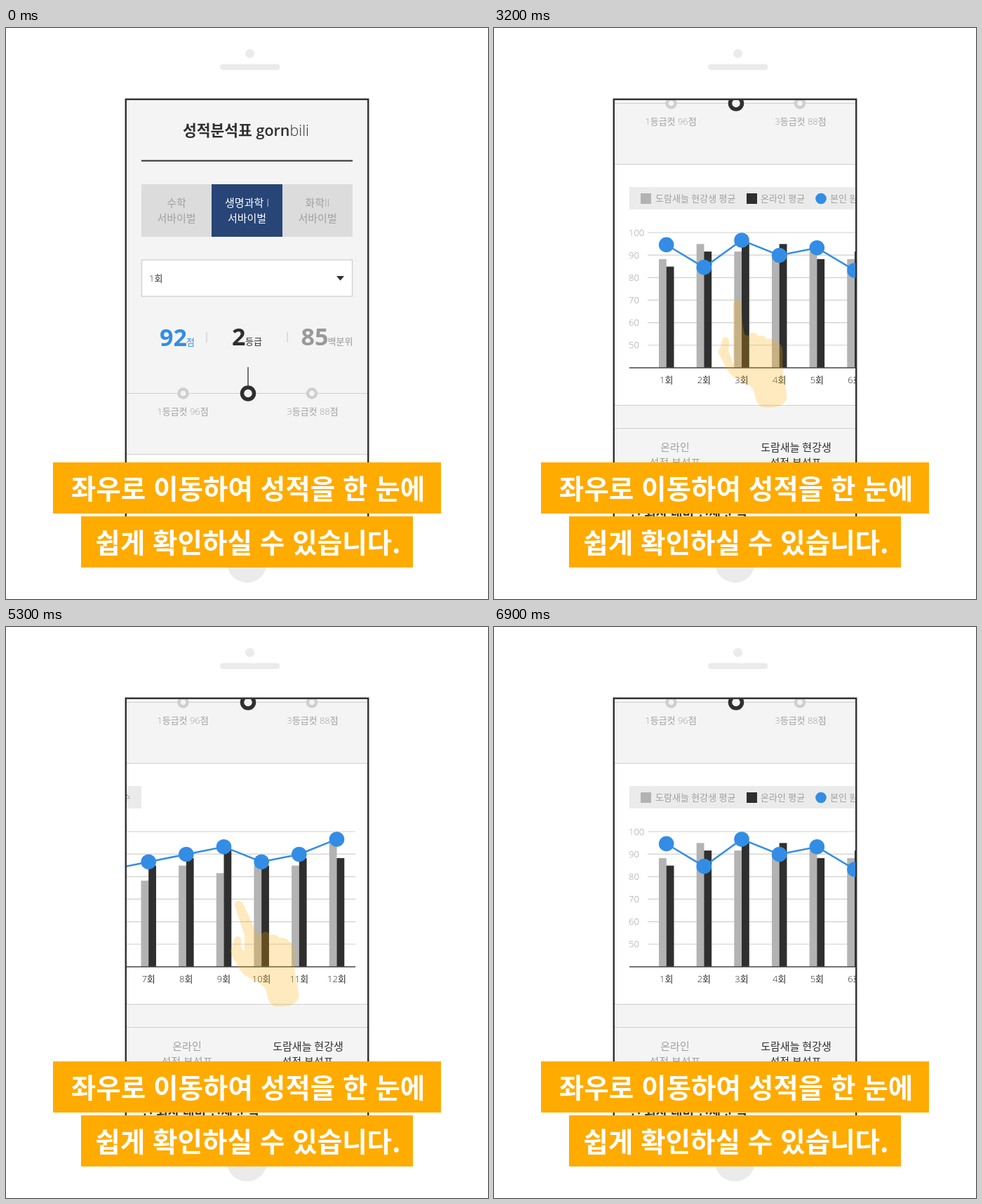
Recreate the animation shown at these times as an HTML page. Size 687 px wide and 815 px high, loop 7000 ms.

```html
<!DOCTYPE html>
<html lang="ko">
<head>
<meta charset="utf-8">
<style>
html, body { margin: 0; width: 100%; height: 100%; overflow: hidden; background: #fff; }
svg { display: block; }
text { font: 300 13px "Open Sans", "Noto Sans CJK KR", sans-serif; white-space: pre; }
</style>
</head>
<body>
<svg id="stage" width="687" height="815" viewBox="0 0 687 815"></svg>
<script>
const DARK = '#2f2f2f', GREY = '#a0a0a0', RULE = '#cfcfcf', PALE = '#ebebeb',
      PANEL = '#f4f4f4', BLUE = '#338de4', AMBER = '#ffab00';

const rect = (x, y, w, h, fill, more = '') =>
  `<rect x="${x}" y="${y}" width="${w}" height="${h}" fill="${fill}" ${more}/>`;
const line = (x1, y1, x2, y2, color, w = 1.2) =>
  `<path d="M${x1} ${y1}L${x2} ${y2}" stroke="${color}" stroke-width="${w}"/>`;
const dot = (x, y, r, fill, more = '') =>
  `<circle cx="${x}" cy="${y}" r="${r}" fill="${fill}" ${more}/>`;
const ring = (x, y, r, color, w) => dot(x, y, r, PANEL, `stroke="${color}" stroke-width="${w}"`);
const text = (x, y, str, color, size = 13, weight = 300, anchor = 'start') =>
  `<text x="${x}" y="${y}" fill="${color}" text-anchor="${anchor}" style="font-size:${size}px;font-weight:${weight}">${str}</text>`;
const label = (x, y, str, color, size, weight) => text(x, y, str, color, size, weight, 'middle');

function tab(x, w, title, fill, color) {
  const mid = x + w / 2;
  return rect(x, 223, w, 75, fill) + label(mid, 255, title, color, 15) + label(mid, 276.5, '서바이벌', color, 15);
}

function score(x, unitX, value, unit, color, unitColor, y = 453) {
  return text(x, y, value, color, 34, 700) + text(unitX, y - 1, unit, unitColor);
}

function summary() {
  return text(252, 153.5, '성적분석표 gorn<tspan style="font-weight:300">bili</tspan>', DARK, 21.5, 600)
    + line(193, 189.5, 494, 189.5, DARK, 2.2)
    + tab(193, 100, '수학', '#dcdcdc', GREY)
    + tab(394, 100, '화학II', '#dcdcdc', GREY)
    + tab(293, 101, '생명과학 I', '#284577', '#fff')
    + rect(193.5, 331, 300, 52, '#fff', 'stroke="#ccc" stroke-width="1.2"')
    + text(204, 362, '1회', DARK)
    + `<path d="M471 354h11l-5.5 6.5z" fill="${DARK}"/>`
    + score(219, 257, '92', '점', BLUE, BLUE, 454)
    + score(322, 341, '2', '등급', DARK, DARK)
    + score(420.5, 458.5, '85', '백분위', '#999', '#999')
    + line(286, 434, 286, 449, RULE) + line(401, 434, 401, 449, RULE)
    + line(172, 521.5, 516, 521.5, RULE) + line(345, 484, 345, 513, DARK, 1.3)
    + ring(252.5, 521.5, 6, RULE, 4.5) + ring(436, 521.5, 6, RULE, 4.5) + ring(345, 521.5, 8.5, DARK, 5.5)
    + label(252, 552, '1등급컷 96점', GREY) + label(437, 552, '3등급컷 88점', GREY);
}

// Levels count down from the top grid line.
const classLevel = [3.5, 1.5, 2.5, 3, 2.5, 3.5, 6.5, 4.5, 5.5, 4.5, 4.5, 1.5];
const onlineLevel = [4.5, 2.5, 1.5, 1.5, 3.5, 2.5, 4.5, 3.5, 2.5, 4.5, 3.5, 3.5];
const ownLevel = [1.6, 4.6, 1, 3, 2, 5, 4, 3, 2, 4, 3, 1];
const levelY = v => 706.2 + v * 10.75;
const roundX = i => 245.7 + i * 53.66;

function chart() {
  let s = rect(193, 641, 364.5, 32, PALE)
    + rect(209, 650, 15, 15, '#b3b3b3') + text(230, 662, '도람새늘 현강생 평균', GREY)
    + rect(360, 650, 15, 15, DARK) + text(380, 662, '온라인 평균', GREY)
    + dot(466, 657.5, 7.8, BLUE) + text(479, 662, '본인 원점수', GREY);
  for (let i = 0; i < 6; i++) {
    const y = 706 + i * 32.15;
    s += line(219, y, 862.5, y, RULE) + text(192, y + 4.5, 100 - i * 10, GREY);
  }
  const bar = (x, level, fill) => rect(x, levelY(level), 10.8, 899 - levelY(level), fill);
  classLevel.forEach((v, i) => {
    s += bar(roundX(i) - 10.7, v, '#b3b3b3') + bar(roundX(i), onlineLevel[i], DARK)
      + label(roundX(i), 920.5, i + 1 + '회', DARK);
  });
  s += line(193, 899, 862.5, 899, '#444', 1.4);
  const points = ownLevel.map((v, i) => [roundX(i), levelY(v)]);
  s += `<polyline points="${points.join(' ')}" fill="none" stroke="${BLUE}" stroke-width="2.5"/>`;
  return s + points.map(([x, y]) => dot(x, y, 10.8, BLUE)).join('');
}

function details() {
  return line(172, 952.5, 516, 952.5, RULE) + line(172, 985.5, 516, 985.5, RULE)
    + label(258, 1018, '온라인', GREY, 15) + label(258, 1040, '성적 분석표', GREY, 15)
    + label(430.5, 1018, '도람새늘 현강생', DARK, 15) + label(430, 1040, '성적 분석표', DARK, 15)
    + text(193, 1112, '전 회차 대비 전체 분석', DARK, 18, 600);
}

const banner = (x, y, w, str) => rect(x, y, w, 73, AMBER)
  + `<text x="345" y="${y + 51.5}" fill="#fff" text-anchor="middle" style="font:700 38.6px 'Noto Sans CJK KR',sans-serif">${str}</text>`;

const stroke = (id, d) =>
  `<path id="${id}" d="${d}" fill="none" stroke="${AMBER}" stroke-width="6" stroke-linecap="round" stroke-linejoin="round"/>`;

const stage = document.getElementById('stage');
stage.innerHTML = `<clipPath id="screen"><rect x="172" y="103" width="343" height="640"/></clipPath>`
  + dot(347.5, 36.5, 6.5, PALE) + rect(305, 51.5, 85.5, 8.5, PALE, 'rx="4.2"') + dot(343.5, 763, 28.5, PALE)
  + rect(170.75, 101.75, 345.5, 645, PANEL, `stroke="${DARK}" stroke-width="2.4"`)
  + `<g clip-path="url(#screen)"><g id="page">${summary()}${rect(172, 608.5, 344, 344, '#fff')}`
  + `${line(172, 608.5, 516, 608.5, RULE)}<g id="chart">${chart()}</g>${details()}</g></g>`
  + `<path id="hand" fill="${AMBER}"/>`
  + stroke('toLeft', 'M363 392Q354 392 347 395M322 402L302 411M311 394L302 411L319 416')
  + stroke('toRight', 'M319 402.5Q326 400.5 333 397.5M359 390.5L381 391M367 378L381 391L371 403')
  + banner(67, 620, 553, '좌우로 이동하여 성적을 한 눈에')
  + banner(107, 697, 473, '쉽게 확인하실 수 있습니다.');

const [page, chartBox, hand, toLeft, toRight] =
  ['page', 'chart', 'hand', 'toLeft', 'toRight'].map(id => document.getElementById(id));
const clamp = v => Math.max(0, Math.min(1, v));

// lean 0: finger upright, 1: finger tilted to the left
function handPath(lean) {
  const p = (x, y, tx, ty) => `${x + (tx - x) * lean} ${y + (ty - y) * lean} `;
  return 'M' + p(341, 394, 326.5, 399) + 'C' + p(341, 385, 323.5, 391) + p(353, 385, 334, 387) + p(353, 394, 338.5, 396)
    + 'Q' + p(353, 422, 349, 418) + '357 437Q362 441 365 437Q371 432 377 440Q384 437 389 444Q398 442 403 448'
    + 'Q412 452 411.5 463C411 480 411 490 414.5 505L417.5 526Q418 533 409 538.5Q397 543.5 382 541Q374 538 372 524'
    + 'Q371 514 361 508.5L340 497Q334 492 328 480L320 464Q319 460 323 455L325 446Q327 440 332 442'
    + 'Q336 443 335 452Q' + p(333, 462, 334, 455) + p(338, 470, 337, 460)
    + 'L' + p(341, 480, 340, 462) + 'L' + p(341, 440, 340, 440) + 'Z';
}

function draw() {
  const t = performance.now() % 7000;
  const steps = start => Math.max(0, Math.floor((t - start) / 100) + 1);
  const scroll = Math.min(57.2 * steps(2000), 414);
  const swipe = Math.min(57.25 * steps(4200), 364.5) - Math.min(57.25 * steps(6300), 364.5);
  page.setAttribute('transform', `translate(0 ${-scroll})`);
  chartBox.setAttribute('transform', `translate(${-swipe} 0)`);

  const back = t >= 5300;
  const n = steps(back ? 5300 : 3200);
  const turn = clamp((n - 8) / 2);
  const fade = clamp(Math.min(n / 4, (14 - n) / 4));
  const arrow = Math.min(turn, fade);
  hand.setAttribute('d', handPath(back ? 1 - turn : turn));
  hand.setAttribute('opacity', fade);
  toLeft.setAttribute('opacity', back ? 0 : arrow);
  toRight.setAttribute('opacity', back ? arrow : 0);
  requestAnimationFrame(draw);
}
draw();
</script>
</body>
</html>
```
